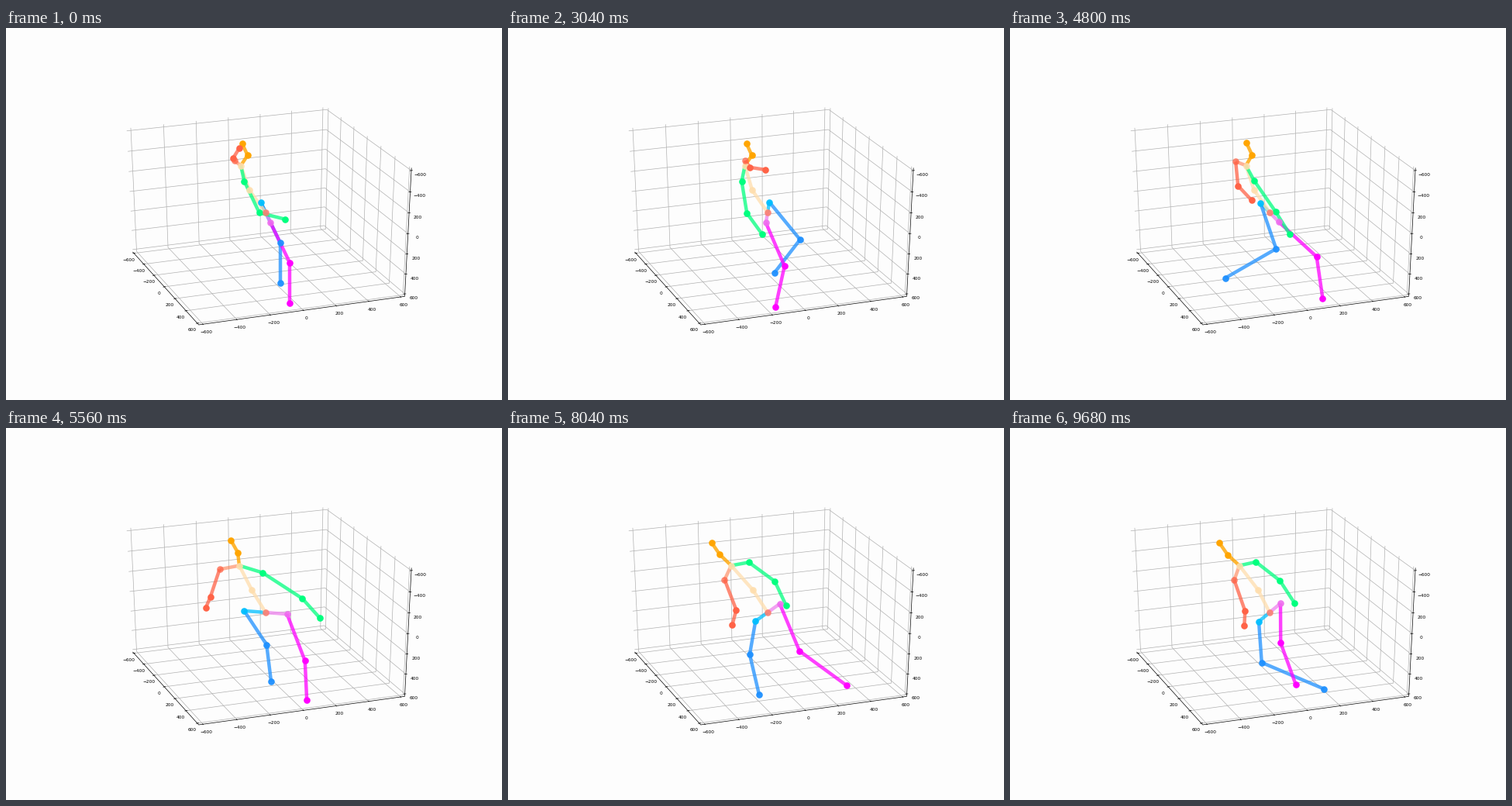
A matplotlib script for the animation above (9720 ms loop, 640x480 px).

```python
import numpy as np
import matplotlib.pyplot as plt
from matplotlib.animation import FuncAnimation
from matplotlib.collections import LineCollection

W, H, DPI = 640, 480, 100
FRAMES, STEP = 243, 40
BACKGROUND = "#fdfdfd"

# Camera of the plot box
CENTER = np.array([334.3, 237.4])
SCALE = np.array([268.1, -188])
TURN, TILT = np.radians(20.3), np.radians(28)
FLATTEN, DISTANCE = 0.94, 10
EDGE = 625
TICKS = range(-600, 601, 200)


def project(x, y, z):
    """Map box coordinates (y to the front, z down) to pixels."""
    x, y, z = x / 1200, y / 1200, -FLATTEN * z / 1200
    right = x * np.cos(TURN) + y * np.sin(TURN)
    front = y * np.cos(TURN) - x * np.sin(TURN)
    depth = front * np.cos(TILT) + z * np.sin(TILT)
    up = z * np.cos(TILT) - front * np.sin(TILT)
    return CENTER + SCALE * np.array([right, up]) * DISTANCE / (DISTANCE - depth)


def path(*points):
    return [project(*p) for p in points]


def label(ax, pos, text):
    ax.text(*pos, text, fontsize=4.2, ha="center", va="center", family="DejaVu Sans")


def draw_box(ax):
    grid = []
    black = [path((-EDGE, -EDGE, EDGE), (-EDGE, EDGE, EDGE),
                  (EDGE, EDGE, EDGE), (EDGE, EDGE, -EDGE))]
    inner, outer = EDGE - 9, EDGE + 8
    for v in TICKS:
        grid.append(path((v, EDGE, EDGE), (v, -EDGE, EDGE), (v, -EDGE, -EDGE)))
        grid.append(path((-EDGE, v, EDGE), (EDGE, v, EDGE), (EDGE, v, -EDGE)))
        grid.append(path((-EDGE, -EDGE, v), (EDGE, -EDGE, v), (EDGE, EDGE, v)))
        black.append(path((v, inner, EDGE), (v, outer, EDGE)))
        black.append(path((-inner, v, EDGE), (-outer, v, EDGE)))
        black.append(path((inner, EDGE, v), (outer, EDGE, v)))

        name = str(v).replace("-", "\u2212")
        label(ax, project(v, EDGE, EDGE) + (4, 10.5), name)
        label(ax, project(-EDGE, v, EDGE) + (-6.5, 8.5), name)
        label(ax, project(EDGE, EDGE, v) + (11.5, 5.5), "200" if v == -200 else name)
    ax.add_collection(LineCollection(grid, colors="#b0b0b0", linewidths=0.5, zorder=1))
    ax.add_collection(LineCollection(black, colors="black", linewidths=0.5, zorder=1.5))


t = np.arange(FRAMES) * STEP / 1000
KEYS = np.array([0, 1.88, 4.08, 5.56, 6.76, 8.04, 9.68])


def curve(*values):
    """Smooth curve through one value per key time, without overshoot."""
    values = np.array(values, float)
    span = np.diff(KEYS)
    rate = np.diff(values) / span
    a, b = rate[:-1], rate[1:]
    same = a * b > 0
    slope = np.zeros(len(KEYS))
    slope[1:-1][same] = (2 * a * b)[same] / (a + b)[same]
    i = np.clip(np.searchsorted(KEYS, t, side="right") - 1, 0, len(span) - 1)
    s = (t - KEYS[i]) / span[i]
    rise = s * s * (3 - 2 * s)
    bend = span[i] * s * (1 - s) * ((1 - s) * slope[i] - s * slope[i + 1])
    return values[i] * (1 - rise) + values[i + 1] * rise + bend


def vec(x, y):
    return np.stack(np.broadcast_arrays(x, y, t)[:2], axis=-1)


# The figure stands, walks to the right, turns round and walks to the left.
heading = np.radians(curve(-103, -97, -78, -171, -209, -236, -240))
side, left = np.cos(heading), np.sin(heading)
start = np.clip((t - 2.3) / 1.1, 0, 1)
walk = start * start * (3 - 2 * start)
phase = np.radians(195 + 157 * (t - 4.08))

# Torso and head
root = vec(335.0, 238.0)
neck = root + vec(curve(-32, -30, -29, -34, -47, -47, -39), -60.5)
spine = (root + neck) / 2 + vec(5.4 * left, 1.2)
chin = neck + vec(-4 - 13 * left, 4 * left ** 2 - 17)
crown = chin + vec(-9 - 2 * left, -15.5)

# Hips and shoulders turn with the heading
hip_turn = vec(28 * side, 13.5 * left)
chest = neck + vec(3 + 5 * left, 7)

# Arms
green_shoulder = chest - hip_turn
green_elbow = green_shoulder + vec(10 - 42 * side, 32 - 9 * left)
bend = np.radians(curve(76, 58, 23, 42, 36, 25, 33))
green_wrist = green_elbow + 34 * vec(np.sin(bend), np.cos(bend))

red_shoulder = chest + hip_turn
red_elbow = red_shoulder + vec(curve(-2, -6, 17, -12, -1, 15, 14),
                               curve(-3, -3, 24, 36, 37, 39, 40))
red_wrist = red_elbow + vec(curve(8, 4, 33, -6, -21, -5, -1),
                            curve(-13, -18, 21, 14, 9, 19, 19))

# Legs
reach = curve(25, 21, 41, 26, 23, 9, 2)


def leg(hip, q):
    """Hip, knee and foot at phase q of the stride."""
    swing = walk * np.sin(q)
    flex = walk * ((1 + np.cos(q + np.radians(15))) / 2) ** 2
    knee = hip + vec(reach - 20 * left * swing, 52 - 9 * swing)
    back = left * (68 * flex - 17 * swing)
    foot = knee + vec(walk * (9 + 14 * left) + back, 52 + 2 * walk - 20 * flex)
    return hip, knee, foot


# Each bone: bone colour, bone alpha, joint colour, joint alpha
BLUE = ("dodgerblue", 0.75, "dodgerblue", 0.95)
PINK = ("magenta", 0.75, "magenta", 1)
WHEAT = ("navajowhite", 0.75, "navajowhite", 0.9)
ORANGE = ("orange", 0.8, "orange", 1)
GREEN = ("springgreen", 0.75, "springgreen", 1)
RED = ("tomato", 0.75, "tomato", 1)

chains = [
    ((root, *leg(root + hip_turn, phase)),
     (("deepskyblue", 0.75, "deepskyblue", 0.95), BLUE, BLUE)),
    ((root, *leg(root - hip_turn, phase + np.pi)),
     (("violet", 0.75, "#ee6cee", 0.9), PINK, PINK)),
    ((root, spine, neck, chin, crown), (WHEAT, WHEAT, ORANGE, ORANGE)),
    ((neck, green_shoulder, green_elbow, green_wrist), (GREEN, GREEN, GREEN)),
    ((neck, red_shoulder, red_elbow, red_wrist),
     (("coral", 0.6, "tomato", 0.75), RED, RED)),
]

fig = plt.figure(figsize=(W / DPI, H / DPI), dpi=DPI, facecolor=BACKGROUND)
ax = fig.add_axes([0, 0, 1, 1])
ax.set(xlim=(0, W), ylim=(H, 0))
ax.axis("off")
draw_box(ax)

DOT = dict(marker="o", ms=6.2, mew=0, ls="", zorder=4)
parts = []
for joints, styles in chains:
    for a, b, (bone, bone_alpha, joint, joint_alpha) in zip(joints, joints[1:], styles):
        line, = ax.plot([], [], color=bone, alpha=bone_alpha, lw=3.2, zorder=3,
                        solid_capstyle="butt")
        dot, = ax.plot([], [], color=joint, alpha=joint_alpha, **DOT)
        parts.append((a, b, line, dot))
ax.plot(*root[0], color="salmon", alpha=0.9, **DOT)


def update(i):
    for a, b, line, dot in parts:
        line.set_data(*np.transpose([a[i], b[i]]))
        dot.set_data(*b[i:i + 1].T)
    return [artist for part in parts for artist in part[2:]]


anim = FuncAnimation(fig, update, frames=FRAMES, interval=STEP, repeat=True, repeat_delay=0)
plt.show()
```
